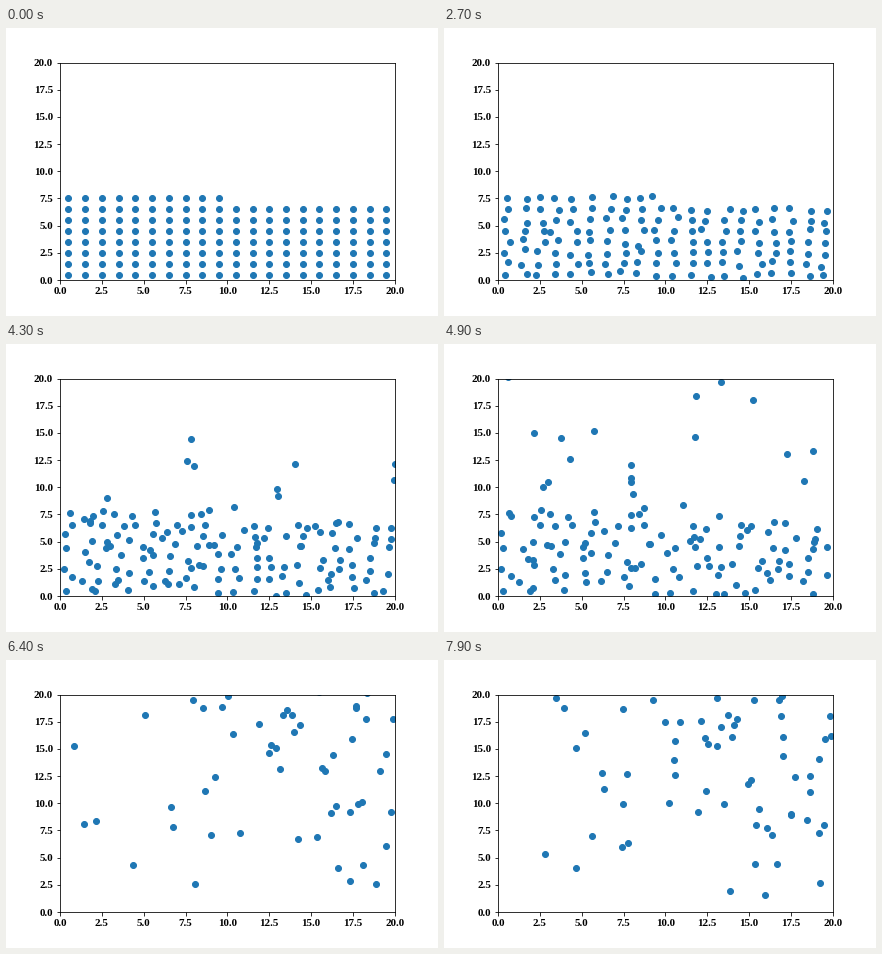
Write a matplotlib script that moves like this. It is 432 by 288 pixels and loops after 8000 ms.

```python
import numpy as np
import matplotlib.pyplot as plt
from matplotlib.animation import FuncAnimation

plt.rcParams.update({"font.family": "Liberation Serif", "font.weight": "bold",
                     "font.size": 11})

SIZE = 20
COUNT, N_EARLY, N_GAS = 150, 42, 75
FRAMES, STEP = 80, 100
T_BURST, T_JOIN, T_GAS = 4.9, 6.2, 7.1
rng = np.random.default_rng(4)

idx = np.arange(COUNT)
home = np.column_stack([idx % SIZE, idx // SIZE]) + 0.5
drift = rng.normal(0, 0.05, (COUNT, 2))

early, late, gas = np.split(rng.permutation(COUNT), [N_EARLY, COUNT - N_GAS])
release = np.full(COUNT, np.inf)
velocity = np.zeros((COUNT, 2))


def launch(group, start, end, slow, fast):
    n = len(group)
    release[group] = rng.uniform(start, end, n)
    velocity[group] = np.column_stack([rng.normal(0, 4, n),
                                       rng.uniform(slow, fast, n)])


launch(early, 3.9, T_BURST, 20, 35)
launch(late, T_BURST, 5.5, 25, 30)

# Gas cloud, denser towards the upper right and reaching above the axes
cloud = np.column_stack([SIZE * np.sqrt(rng.random(N_GAS)),
                         24 * rng.beta(2.5, 1.5, N_GAS)])
cloud_v = rng.normal((0, -1), (2.5, 3), (N_GAS, 2))
gas_start = rng.uniform(T_BURST, 5.5, N_GAS)


def lattice(t):
    return home + drift * t * (1 + 0.5 * (t / 5) ** 6)


def smoothstep(u):
    u = np.clip(u, 0, 1)
    return u * u * (3 - 2 * u)


def positions(t):
    pos = lattice(t) + velocity * np.maximum(t - release, 0)[:, None]
    w = smoothstep((t - gas_start) / (T_JOIN - gas_start))[:, None]
    pos[gas] = (1 - w) * pos[gas] + w * (cloud + cloud_v * (t - T_GAS))
    # Side walls and floor reflect, the top is open
    pos = np.abs(pos)
    pos[:, 0] = SIZE - np.abs(SIZE - pos[:, 0])
    return pos


fig, ax = plt.subplots(figsize=(6, 4), dpi=72)
fig.subplots_adjust(left=0.125, right=0.9, bottom=0.125, top=0.88)
ticks = np.arange(0, SIZE + 1, 2.5)
ax.set(xlim=(0, SIZE), ylim=(0, SIZE), xticks=ticks, yticks=ticks)
dots, = ax.plot([], [], "o", color="C0", markersize=6)


def update(frame):
    dots.set_data(*positions(frame * STEP / 1000).T)
    return dots,


anim = FuncAnimation(fig, update, frames=FRAMES, interval=STEP,
                     repeat=True, repeat_delay=0)
plt.show()
```
